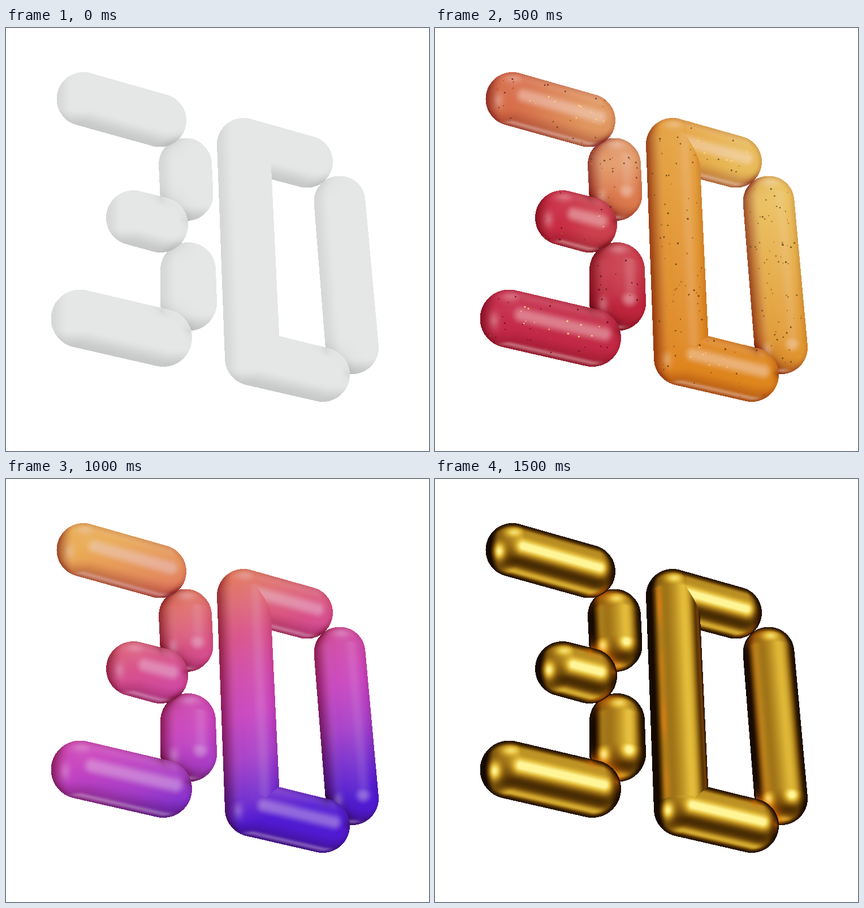
These frames come from a looping animation (748 by 748 pixels, 2 s). An HTML page with a canvas:

```html
<!DOCTYPE html>
<html lang="en">
<head>
<meta charset="utf-8">
<title>3D</title>
<style>
  html, body { margin: 0; width: 100%; height: 100%; overflow: hidden; background: #fff; }
  canvas { display: block; width: 748px; height: 748px; }
</style>
</head>
<body>
<canvas id="stage" width="748" height="748"></canvas>
<script>
const SIZE = 748, HOLD = 500;

// Each tube: two end balls, layer, letter, starting depth, jelly colours, speckle count
const tube = (a, b, layer, letter, z, from, to, dots) => {
  const dx = b[0] - a[0], dy = b[1] - a[1], len = Math.hypot(dx, dy);
  const tall = dy > dx, tilt = tall ? 0.4 : -0.38;
  return { a, b, layer, letter, z, dots, tall, len, tilt, lean: Math.sqrt(1 - tilt * tilt),
           ux: dx / len, uy: dy / len, from: hex(from), to: hex(to) };
};
const hex = s => [0, 2, 4].map(i => parseInt(s.substr(i, 2), 16));

const tubes = [
  tube([137, 125.5, 47.5], [272, 163.5, 47], 1, 3, 0, 'd66c48', 'e0965e', 34),
  tube([317, 241.5, 47], [319.5, 294, 47], 0, 3, 0, 'e29a68', 'dc7a4c', 24),
  tube([225.5, 335.5, 48.5], [273, 348, 49], 1, 3, 0, 'c82a42', 'cc3e4c', 14),
  tube([322, 428, 49], [323, 485.5, 50], 0, 3, 0, 'c83a4a', 'be243c', 18),
  tube([131, 514, 51.5], [278, 548, 51], 1, 3, 0, 'c42848', 'c22844', 46),
  tube([420, 206, 47], [532, 236.5, 46], 1, 1, 0, 'e4a03c', 'e8ba58', 26),
  tube([420, 206, 47], [436, 583.5, 49], 1, 1, 0, 'e4a03c', 'de841c', 70),
  tube([436, 583.5, 49], [560, 613, 48], 1, 1, 165, 'de841c', 'de861c', 28),
  tube([590, 307, 45.5], [612, 565, 47], 0, 1, 0, 'eac05c', 'e0962e', 70)
];

const sunset = [[160, 'eaac52'], [250, 'e48c5c'], [300, 'e2735f'], [340, 'de6873'], [400, 'd85087'],
  [470, 'd048a8'], [540, 'c842be'], [620, 'a53cc8'], [680, '782dcd'], [740, '5019d2']]
  .map(([at, c]) => [at, hex(c)]);
const metal = [[0, '160900'], [0.25, '5f3c05'], [0.5, 'a67a19'], [0.75, 'e1b937'], [1, 'fff596']]
  .map(([at, c]) => [at, hex(c)]);

const clamp = v => Math.max(0, Math.min(1, v));
const smooth = (lo, hi, v) => { v = clamp((v - lo) / (hi - lo)); return v * v * (3 - 2 * v); };
const mix = (p, q, k) => p.map((v, i) => v + (q[i] - v) * k);
const scale = (c, k) => c.map(v => v * k);
const bell = (x, y, cx, cy, sx, sy) => Math.exp(-(((x - cx) / sx) ** 2 + ((y - cy) / sy) ** 2) / 2);
const ramp = (stops, v) => {
  let i = 1;
  while (i < stops.length - 1 && v > stops[i][0]) i++;
  const [p, q] = [stops[i - 1], stops[i]];
  return mix(p[1], q[1], clamp((v - p[0]) / (q[0] - p[0])));
};

// Surface of a tube under a point: normal, depth and place along the axis
function hit(t, x, y) {
  const { a, b, ux, uy, len, tilt, lean } = t;
  const px = x - a[0], py = y - a[1];
  const along = px * ux + py * uy, side = py * ux - px * uy;
  const k = clamp(along / len), r = a[2] + (b[2] - a[2]) * k, s = side / r;
  if (Math.abs(s) > 1.03) return null;
  const h = Math.sqrt(Math.max(0, 1 - s * s)), at = along + r * h * tilt;
  const slope = tilt / lean;
  if (at >= 0 && at <= len && Math.abs(s) <= 1) {
    return { nx: -uy * s - tilt * h * ux, ny: ux * s - tilt * h * uy,
             z: t.z + at * slope + r * h * lean, k };
  }
  const end = at < 0 ? a : b;
  const nx = (x - end[0]) / end[2], ny = (y - end[1]) / end[2], q = nx * nx + ny * ny;
  if (q > 1) return null;
  return { nx, ny, z: t.z + (at < 0 ? 0 : len * slope) + end[2] * Math.sqrt(1 - q), k };
}

function gap(t, x, y) {
  const px = x - t.a[0], py = y - t.a[1];
  const k = clamp((px * t.ux + py * t.uy) / t.len);
  return Math.hypot(px - t.ux * t.len * k, py - t.uy * t.len * k) - t.a[2] - (t.b[2] - t.a[2]) * k;
}

// Shade where tubes of one letter touch; front tubes only catch it on their rim
function contact({ t, x, y, nx, ny }) {
  let near = 99;
  for (const o of tubes) {
    if (o.letter === t.letter && o.layer !== t.layer) near = Math.min(near, Math.abs(gap(o, x, y)));
  }
  return Math.exp(-near / 9) * (t.layer ? smooth(0.65, 0.95, Math.hypot(nx, ny)) : 1);
}

function trace() {
  const grid = new Array(SIZE * SIZE), pad = 54;
  for (const t of tubes) {
    const x0 = Math.floor(Math.min(t.a[0], t.b[0]) - pad), x1 = Math.max(t.a[0], t.b[0]) + pad;
    const y0 = Math.floor(Math.min(t.a[1], t.b[1]) - pad), y1 = Math.max(t.a[1], t.b[1]) + pad;
    for (let y = y0; y < y1; y++) for (let x = x0; x < x1; x++) {
      const p = hit(t, x + 0.5, y + 0.5);
      if (!p) continue;
      p.z += t.layer * 10000;
      const i = y * SIZE + x;
      if (!grid[i] || grid[i].z < p.z) grid[i] = Object.assign(p, { t, x, y });
    }
  }
  for (const p of grid) if (p) p.touch = contact(p);
  return grid;
}

// Soft boxes: right, top, left and floor
const keyLight = (x, y) => 1 - smooth(0.04, 0.4, Math.hypot(x - 0.42, y + 0.13));
const topLight = (x, y) => bell(x, y, 0.06, -0.76, 0.25, 0.12);
const leftLight = (x, y) => bell(x, y, -0.52, 0.05, 0.13, 0.21);
const floorLight = (x, y) => bell(x, y, 0, 0.87, 0.21, 0.05);

function plaster({ nx, ny, touch }) {
  const v = 230 - 30 * smooth(0.35, 1, ny) - 15 * smooth(0.4, 1, -nx) - 14 * touch;
  return [v - 1, v, v];
}

function glossy({ nx, ny, touch }, base, tint) {
  const dark = 0.26 * smooth(0.3, 1, ny) + 0.34 * smooth(0.35, 1, -nx)
    + 0.1 * smooth(0.8, 1, Math.hypot(nx, ny)) + 0.25 * touch;
  let c = base.map((v, i) => v * (1 - dark * [0.7, 1.25, 1.1][i]));
  c = mix(c, tint, 0.1 * bell(nx, ny, 0.15, -0.45, 0.4, 0.35));
  const shine = 0.48 * keyLight(nx, ny) + 0.36 * topLight(nx, ny)
    + 0.36 * leftLight(nx, ny) + 0.42 * floorLight(nx, ny);
  return mix(c, tint, Math.min(0.65, shine));
}

function jelly(p) {
  const base = mix(p.t.from, p.t.to, p.k);
  return glossy(p, base, mix([250, 228, 225], base, 0.12));
}

function dusk(p) {
  const base = ramp(sunset, p.y + 0.3 * p.x);
  return glossy(p, base, mix([238, 218, 238], base, 0.2));
}

function gold(p) {
  const { nx, ny, t, y, touch } = p;
  const edge = Math.hypot(nx, ny);
  let v = 0.27 + 0.24 * bell(nx, ny, 0.12, -0.42, 0.42, 0.3)
    - 0.12 * bell(nx, ny, 0.2, 0.4, 0.35, 0.13)
    + 0.68 * bell(nx, ny, 0.42, -0.12, 0.2, 0.2)
    + 0.45 * bell(nx, ny, 0.06, -0.68, 0.26, 0.13)
    + 0.7 * bell(nx, ny, -0.5, 0.05, 0.16, 0.22)
    + 0.42 * bell(nx, ny, 0.05, 0.78, 0.26, 0.1);
  v -= 0.34 * smooth(0.5, 0.85, -nx) + 0.2 * smooth(0.55, 0.9, nx);
  v *= 1 - 0.85 * smooth(0.8, 1, edge);
  let c = ramp(metal, clamp(v));
  if (t.tall && t.len > 200) {
    const wave = 0.55 + 0.25 * Math.sin(y / 16) + 0.2 * Math.sin(y / 31 + 1);
    const glow = t.layer ? 0.75 * wave * bell(nx, ny, -0.52, -0.34, 0.07, 0.15)
                             + 0.4 * bell(nx, ny, 0.9, -0.17, 0.05, 0.15)
                         : 0.25 * bell(nx, ny, -0.62, -0.3, 0.14, 0.15);
    c = mix(c, [226, 122, 18], glow);
  }
  return mix(c, [232, 110, 8], 0.6 * touch * (1 - smooth(0.9, 1, edge)));
}

function paint(grid, shade) {
  const cv = document.createElement('canvas');
  cv.width = cv.height = SIZE;
  const g = cv.getContext('2d'), img = g.createImageData(SIZE, SIZE);
  img.data.fill(255);
  grid.forEach((p, i) => { if (p) img.data.set(shade(p).map(Math.round), i * 4); });
  g.putImageData(img, 0, 0);
  return cv;
}

function sprinkle(cv, grid) {
  const g = cv.getContext('2d');
  let seed = 41;
  const rnd = () => (seed = seed * 16807 % 2147483647) / 2147483647;
  for (const t of tubes) for (let n = 0; n < t.dots; n++) {
    const along = rnd() * (t.len + 60) - 30, side = (rnd() * 1.8 - 0.9) * t.a[2];
    const x = t.a[0] + t.ux * along - t.uy * side, y = t.a[1] + t.uy * along + t.ux * side;
    const pick = rnd(), r = 0.9 + rnd() * 0.8;
    const p = grid[Math.floor(y) * SIZE + Math.floor(x)];
    if (!p || p.t !== t) continue;
    const base = mix(t.from, t.to, p.k);
    const lit = !t.tall && keyLight(p.nx, p.ny) > 0.2;
    const c = lit ? [250, 216, 120] : pick < 0.55 ? scale(base, 0.5) : mix(base, [165, 90, 25], 0.65);
    g.fillStyle = `rgb(${c.map(Math.round)})`;
    g.beginPath();
    g.arc(x, y, r, 0, 7);
    g.fill();
  }
}

const grid = trace();
const looks = [plaster, jelly, dusk, gold].map(shade => paint(grid, shade));
sprinkle(looks[1], grid);

const ctx = document.getElementById('stage').getContext('2d');
let shown = -1;
function draw(now) {
  const i = Math.floor(now / HOLD) % looks.length;
  if (i !== shown) ctx.drawImage(looks[shown = i], 0, 0);
}
const start = performance.now();
function tick() {
  draw(performance.now() - start);
  requestAnimationFrame(tick);
}
tick();
</script>
</body>
</html>
```
